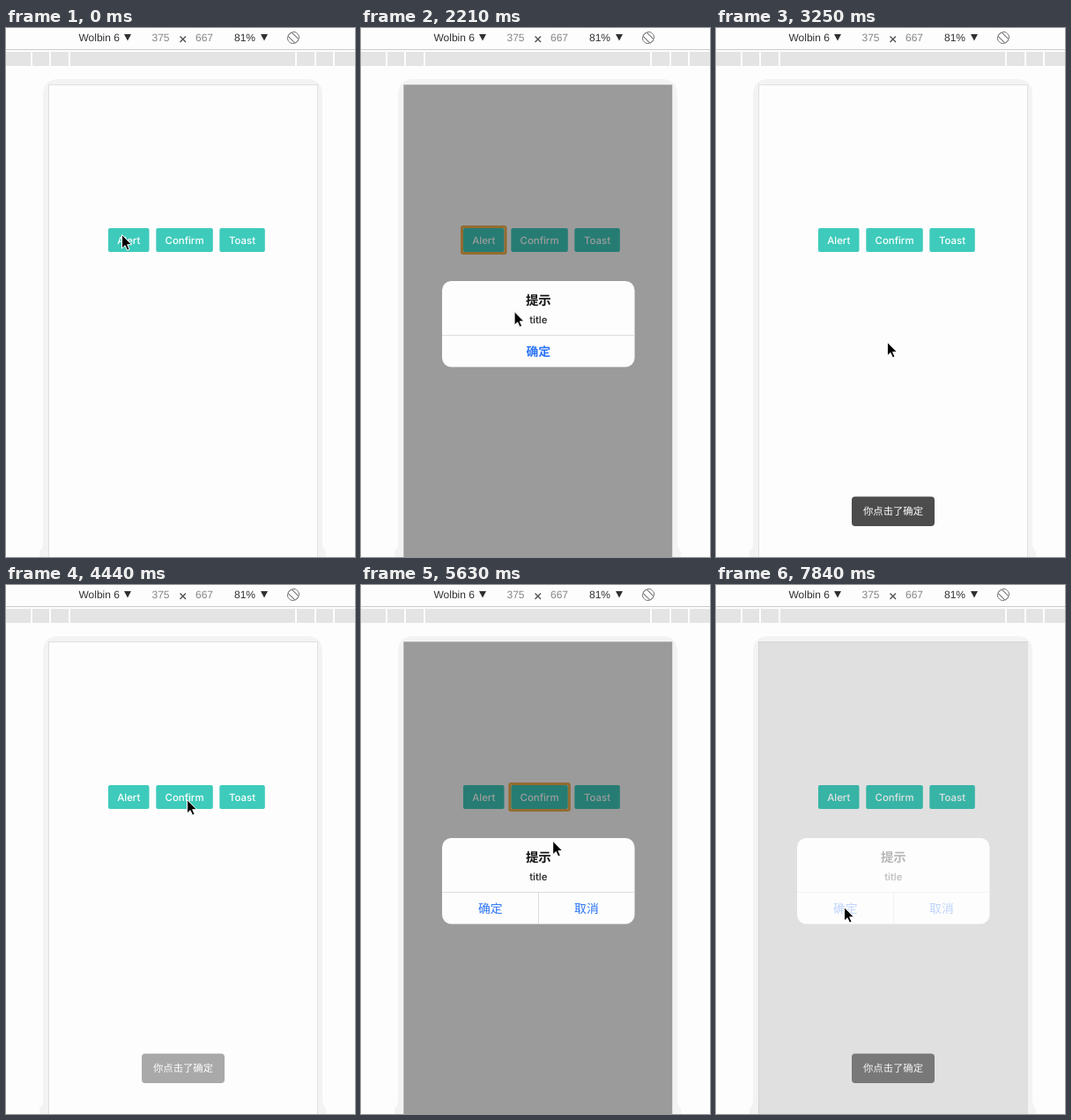
Recreate the animation shown at these times as an HTML page. Size 396 px wide and 600 px high, loop 7990 ms.

```html
<!DOCTYPE html>
<html lang="zh-CN">
<head>
<meta charset="utf-8">
<title>Dialog demo</title>
<style>
  html, body { margin: 0; width: 100%; height: 100%; overflow: hidden; background: #fdfdfd; }
  svg { display: block; width: 396px; height: 600px; }
  text { text-rendering: geometricPrecision; }
  .bar { font: 12px "Liberation Sans", Arial, sans-serif; fill: #303030; }
  .bar .dim { fill: #858585; }
  .ui { font: 500 11.4px Inter, sans-serif; text-anchor: middle; }
  .cjk { font: 400 13.8px "Noto Sans CJK SC", "Noto Sans CJK", sans-serif; text-anchor: middle; }
  .cjk.title { font-size: 14.4px; font-weight: 500; }
  .cjk.strong { font-weight: 700; }
  .cjk.small { font-size: 11.34px; font-weight: 500; }
  .link { fill: #2a74f6; }
</style>
</head>
<body>
<svg viewBox="0 0 396 600">
  <rect width="396" height="600" fill="#fdfdfd"/>

  <g class="bar">
    <text x="82.5" y="15">Wolbin 6</text>
    <text x="165.5" y="15" class="dim">375</text>
    <text x="215" y="15" class="dim">667</text>
    <text x="259" y="15">81%</text>
    <path d="M134 7h8l-4 7.500zM289 7h8l-4 7.500z"/>
    <path d="M197.500 9.500l6.500 6.500m0-6.500l-6.500 6.500" stroke="#505050" stroke-width="1.400"/>
    <g fill="none" stroke="#707070">
      <rect x="-3" y="-6" width="6" height="12" rx="1" transform="translate(326 11) rotate(-45)"/>
      <path d="M325 4.500a6.500 6.500 0 0 1 7.500 7.500M327 17.500a6.500 6.500 0 0 1-7.500-7.500"/>
    </g>
  </g>
  <path d="M0 24.500h396" stroke="#cbcbcb"/>
  <path d="M0 27h28v16H0zM30 27h19v16H30zM51 27h20v16H51zM73 27h255v16H73zM330 27h20v16h-20zM352 27h19v16h-19zM373 27h23v16h-23z" fill="#e4e4e4"/>

  <path d="M38 600V594Q42 590 42 584V76Q42 58 60 58H341Q359 58 359 76V584Q359 590 363 594V600Z" fill="#f3f3f3"/>
  <rect x="48.500" y="64.500" width="305" height="550" fill="#fdfdfd" stroke="#e0e0e0"/>

  <g id="buttons" class="ui"></g>
  <rect id="ring" y="225.500" height="30" rx="1.500" fill="none" stroke="#efb04c" stroke-width="3"/>

  <g id="modal">
    <rect x="48.500" y="64.500" width="304.500" height="536" fill-opacity=".39"/>
    <g id="dialog">
      <rect x="92" y="287" width="218.500" height="97.500" rx="10.500" fill="#fdfdfd"/>
      <path d="M92 348.500h218.500" stroke="#dcdcdc"/>
      <text class="cjk title strong" x="201.300" y="314.200" fill="#111">提示</text>
      <text class="ui" x="201.300" y="334.500" fill="#222">title</text>
      <text id="single" class="cjk link strong" x="201.300" y="371.700">确定</text>
      <g id="pair">
        <path d="M201.500 348.500v36" stroke="#dcdcdc"/>
        <text class="cjk link" x="146.700" y="371.700">确定</text>
        <text class="cjk link" x="255.900" y="371.700">取消</text>
      </g>
    </g>
  </g>

  <g id="toast">
    <rect x="154" y="531.500" width="94" height="33.500" rx="4" fill-opacity=".7"/>
    <text class="cjk small" x="201" y="552.300" fill="#fff">你点击了确定</text>
  </g>

  <path id="cursor" d="M0 0V15.500L3.600 12.200 6 17.600 8.600 16.500 6.200 11.200H11Z" stroke="#fff" stroke-linejoin="round"/>
</svg>
<script>
const LOOP = 7990;
const $ = id => document.getElementById(id);

const bursts = [
  [880, 1020, 2], [1620, 2510, 7], [2950, 3990, 8], [4440, 4590, 2],
  [5040, 6070, 8], [6210, 6800, 5], [7700, 7840, 2]
];
const ticks = [0];
for (const [first, last, count] of bursts)
  for (let i = 0; i < count; i++)
    ticks.push(Math.round((first + (last - first) * i / (count - 1)) / 10) * 10);

const cursorPath = [
  [0, 131.5, 234.5], [740, 131.5, 234.5], [1020, 139.5, 243.5], [1770, 139.5, 243.5],
  [2510, 193.5, 365.5], [3100, 193.5, 365.5], [3990, 205.5, 243.5], [5180, 205.5, 243.5],
  [6070, 229.5, 335.5], [6800, 145.5, 365.5], [LOOP, 145.5, 365.5]
];

const buttons = [['Alert', 116, 46.5], ['Confirm', 170.3, 64.5], ['Toast', 242.3, 51.5]];
$('buttons').innerHTML = buttons.map(([label, x, width]) => `
  <rect x="${x}" y="227" width="${width}" height="27" rx="2" fill="#3ecbbb"/>
  <text x="${x + width / 2}" y="245.200" fill="#fff">${label}</text>
  <rect class="press" x="${x}" y="227" width="${width}" height="27" rx="2" opacity="0"/>`).join('');
const presses = document.querySelectorAll('.press');

const clamp = v => Math.min(1, Math.max(0, v));

// cubic-bezier(.25, .1, .25, 1)
function ease(x) {
  const bezier = (s, a, b) => 3 * s * (1 - s) ** 2 * a + 3 * s * s * (1 - s) * b + s ** 3;
  let low = 0, high = 1;
  for (let i = 0; i < 20; i++) {
    const mid = (low + high) / 2;
    if (bezier(mid, .25, .25) < x) low = mid; else high = mid;
  }
  return bezier(low, .1, 1);
}
const ramp = (t, start, duration = 400) => {
  const x = clamp((t - start) / duration);
  return x === 0 || x === 1 ? x : ease(x);
};

function cursorAt(t) {
  const i = cursorPath.findIndex(key => key[0] > t);
  const [t0, x0, y0] = cursorPath[i - 1], [t1, x1, y1] = cursorPath[i];
  const u = (t - t0) / (t1 - t0), k = u * u * (3 - 2 * u);
  return [x0 + (x1 - x0) * k, y0 + (y1 - y0) * k];
}

function draw(t) {
  const confirming = t >= 4500;
  const [openAt, closeAt, toastAt] = confirming ? [5024, 7672, 7686] : [1500, 2850, 2870];
  const opened = ramp(t, openAt);
  const focused = t >= openAt && t < closeAt;
  const target = confirming ? 1 : 0;

  $('modal').setAttribute('opacity', opened * (1 - ramp(t, closeAt)));
  $('dialog').setAttribute('transform',
    `translate(201.300 335.700) scale(${1.185 - .185 * opened}) translate(-201.300 -335.700)`);
  $('single').setAttribute('visibility', confirming ? 'hidden' : 'visible');
  $('pair').setAttribute('visibility', confirming ? 'visible' : 'hidden');

  const [, x, width] = buttons[target];
  $('ring').setAttribute('x', x - 1.5);
  $('ring').setAttribute('width', width + 3);
  $('ring').setAttribute('visibility', focused ? 'visible' : 'hidden');
  presses.forEach((el, i) =>
    el.setAttribute('opacity', focused && i === target ? .3 * (1 - opened) : 0));

  const toastGone = t < 5000 ? ramp(t, 4373, 217) : 0;
  $('toast').setAttribute('opacity', ramp(t, toastAt) * (1 - toastGone));
  $('cursor').setAttribute('transform', `translate(${cursorAt(t)})`);
}

const begin = performance.now();
function tick() {
  const t = (performance.now() - begin) % LOOP;
  draw(ticks.findLast(step => step <= t));
  requestAnimationFrame(tick);
}
tick();
</script>
</body>
</html>
```
